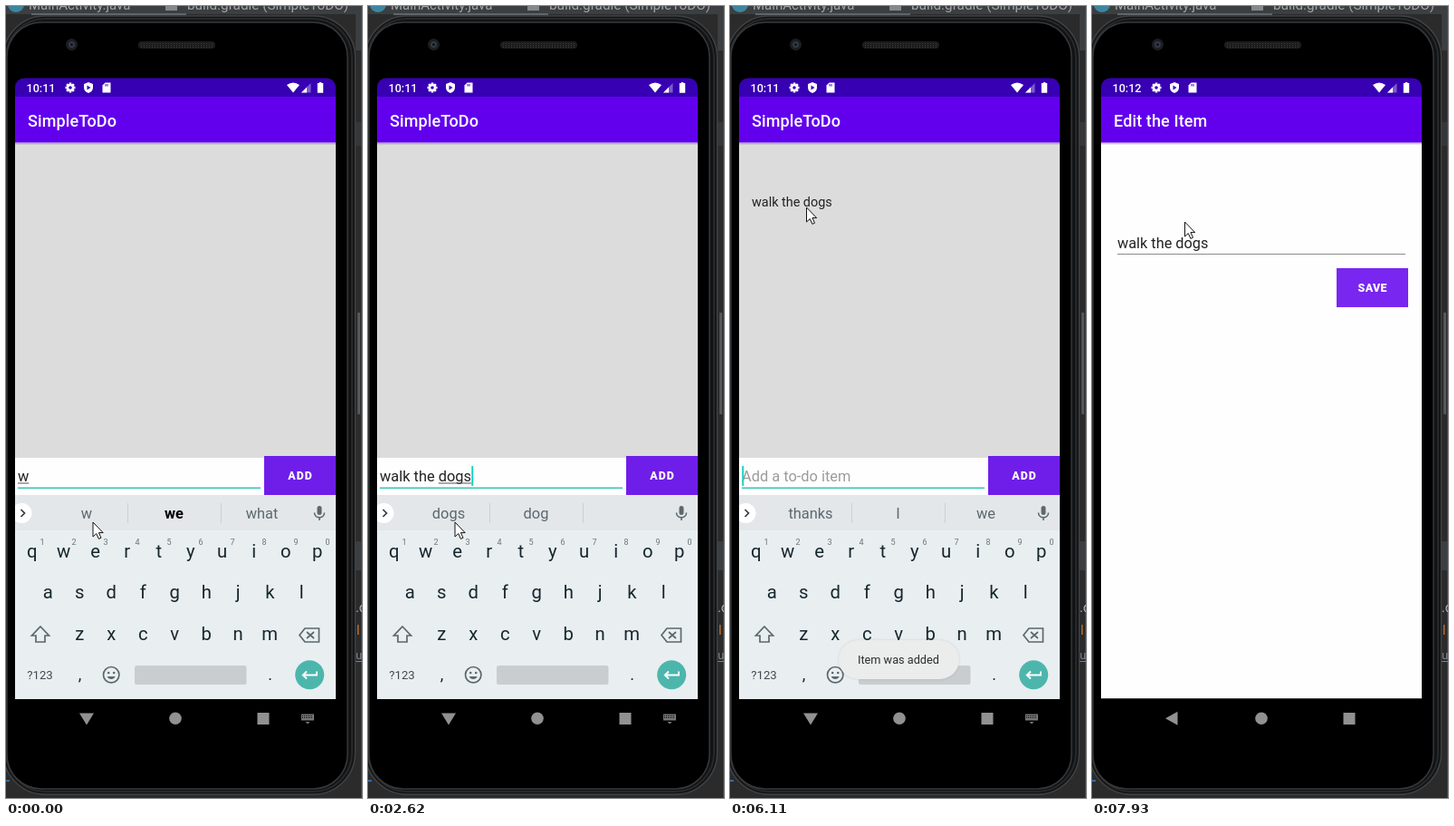
An HTML page with a canvas that plays this animation: 393x873 px, repeating every 8000 ms.

```html
<!DOCTYPE html>
<html lang="en">
<head>
<meta charset="utf-8">
<title>To-do app</title>
<style>
html, body { margin: 0; width: 100%; height: 100%; overflow: hidden; background: #2b2b2b; }
canvas { display: block; width: 393px; height: 873px; }
</style>
</head>
<body>
<canvas id="stage" width="393" height="873"></canvas>
<script>
const c = document.getElementById('stage').getContext('2d');
const LOOP = 8000;

const TICKS = [0, 120, 240, 740, 860, 980, 1130, 1280, 1400, 1910, 2030, 2470, 2620, 3150, 3270, 3410, 3540,
  3670, 3820, 4090, 4210, 4360, 4480, 4620, 4750, 4870, 5010, 5130, 5260, 5570, 5720, 5870, 5990, 6110, 6230,
  6380, 6500, 6620, 6900, 7030, 7420, 7540, 7660, 7780, 7930];

// time, committed text, word being composed, three suggestions, middle one bold
const TYPING = [
  [-600, '', 'w', 'w', 'we', 'what', true],
  [120, '', 'wa', 'wa', 'was', 'want', true],
  [240, '', 'wal', 'wal', 'walk', 'wall', true],
  [740, '', 'walk', 'walk', 'walking', 'walked', true],
  [860, 'walk ', '', 'to', 'the', 'through', false],
  [980, 'walk ', 't', 't', 'to', 'through', true],
  [1130, 'walk ', 'th', 'th', 'the', 'that', true],
  [1280, 'walk ', 'the', 'the', 'they', 'them', false],
  [1400, 'walk the ', '', 'dog', 'same', 'other', false],
  [1910, 'walk the ', 'd', 'd', 'dogs', 'dog', true],
  [2030, 'walk the ', 'do', 'do', 'dog', 'door', true],
  [2470, 'walk the ', 'dog', 'dog', 'dogs', 'does', true],
  [2620, 'walk the ', 'dogs', 'dogs', 'dog', '', false],
  [4090, '', '', 'thanks', 'I', 'we', false],
];

const POINTER = [
  [2620, 96, 569], [3150, 118, 563], [3270, 190, 546], [3410, 238, 532], [3540, 275, 524], [3670, 294, 522],
  [3820, 304.5, 522], [4360, 304.5, 522], [4480, 293, 517], [4620, 282, 513], [4870, 231, 502], [5010, 185, 455],
  [5260, 80, 322], [5570, 79, 219], [5720, 83, 222], [5870, 84.5, 222], [6620, 84.5, 222], [7030, 82.5, 220],
  [7780, 82.5, 220], [7930, 102.5, 238],
];

// Opening the edit screen: keyboard slide and opacity, list shift and dimming,
// reveal edge, edit screen offset, top and bottom of the sliding navigation strip
const OPENING = {
  7420: { keyY: 11, keyAlpha: .84, listY: -1, dim: .03, edge: 873, editY: 30, strip: [774, 793] },
  7540: { keyY: 44, keyAlpha: .23, listY: -3, dim: .085, edge: 261, editY: 23, strip: [786.5, 808] },
  7660: { keyY: 80, keyAlpha: 0, listY: -8, dim: .1, edge: 96, editY: 6 },
};
const RESTING = { keyY: 0, keyAlpha: 1, listY: 0, dim: 0, edge: 873, editY: 0 };
const OPENED = { keyY: 0, keyAlpha: 0, listY: 0, dim: 0, edge: 0, editY: 0 };

const clamp = v => Math.max(0, Math.min(1, v));

function track(keys, t) {
  if (t <= keys[0][0]) return keys[0].slice(1);
  const i = keys.findIndex(k => k[0] > t);
  if (i < 0) return keys[keys.length - 1].slice(1);
  const a = keys[i - 1], b = keys[i], k = (t - a[0]) / (b[0] - a[0]);
  return [a[1] + (b[1] - a[1]) * k, a[2] + (b[2] - a[2]) * k];
}

function rect(x, y, w, h, color) {
  c.fillStyle = color;
  c.fillRect(x, y, w, h);
}

function round(x, y, w, h, r, fill, stroke, width = 1) {
  c.beginPath();
  c.roundRect(x, y, w, h, r);
  if (fill) { c.fillStyle = fill; c.fill(); }
  if (stroke) { c.strokeStyle = stroke; c.lineWidth = width; c.stroke(); }
}

function disc(x, y, r, color) {
  c.beginPath();
  c.arc(x, y, r, 0, 7);
  c.fillStyle = color;
  c.fill();
}

function path(d, x, y, fill, stroke, width = 1) {
  const p = new Path2D(d);
  c.save();
  c.translate(x, y);
  if (fill) { c.fillStyle = fill; c.fill(p); }
  if (stroke) { c.strokeStyle = stroke; c.lineWidth = width; c.stroke(p); }
  c.restore();
}

function text(s, x, y, size, color, { weight = 400, align = 'left', spacing = 0 } = {}) {
  c.font = `${weight} ${size}px Roboto, sans-serif`;
  c.letterSpacing = spacing + 'px';
  c.textAlign = align;
  c.fillStyle = color;
  c.fillText(s, x, y);
  return c.measureText(s).width;
}

function desktop() {
  rect(0, 0, 393, 873, '#2b2b2b');
  rect(0, 0, 393, 9, '#3c3f41');
  disc(11, -2, 9, '#3e86a0');
  text('MainActivity.java', 25, 4, 15, '#a3a6a8');
  rect(176, 0, 13, 5, '#85898c');
  text('build.gradle (SimpleToDO)', 200, 4, 15.3, '#a3a6a8');
  rect(28, 8, 171, 2, '#626567');
  rect(386, 9, 7, 40, '#3c3f41');
  rect(386, 128, 7, 26, '#353739');
  rect(386, 590, 7, 32, '#3c3f41');
  rect(388, 338, 3, 112, '#55585a');
  rect(392, 0, 1, 873, '#484a4c');
  text('.c', 386, 668, 14, '#b5bcc4');
  text('l', 387, 693, 14, '#cc7832');
  text('u', 386, 720, 13, '#7c8790');
  rect(386, 722, 7, 1, '#7c8790');
  rect(0, 853, 4, 2, '#2f6ea8');
}

function phone() {
  round(-3, 11, 388.5, 858, 46, '#121314', '#404244', 1.5);
  round(0, 14, 382, 852, 43, null, '#27292b', 2);
  round(1, 18, 376, 845, 38, '#000', '#38393b', 1.5);
  disc(72.5, 42.5, 6.5, '#1c1e22');
  disc(72.5, 42.5, 3.5, '#343946');
  disc(72.5, 42.5, 1.5, '#11131a');
  round(146, 39, 85, 8, 4, '#1d1d1d');
  for (let x = 149; x < 229; x += 3) for (let y = 41; y < 46; y += 2) rect(x, y, 1, 1, '#383838');
}

function statusIcons(clock) {
  const white = '#fff';
  text(clock, 22.5, 94.5, 12.6, white, { weight: 500 });
  for (let i = 0; i < 8; i++) {
    c.save();
    c.translate(71, 90);
    c.rotate(i * Math.PI / 4);
    rect(-1.3, -5.5, 2.6, 3, white);
    c.restore();
  }
  c.beginPath();
  c.arc(71, 90, 2.9, 0, 7);
  c.strokeStyle = white;
  c.lineWidth = 2.2;
  c.stroke();
  path('M0-6L5-4V0C5 3 3 5 0 6C-3 5-5 3-5 0V-4Z', 91, 90, white);
  path('M-1.5-2.5L2.5 0L-1.5 2.5Z', 91, 90, '#3700b3');
  path('M-1.5-5.5H4.5V5.5H-4.5V-2.5Z', 111, 90, white);
  rect(109.5, 86, 1, 2.5, '#3700b3');
  rect(111.5, 86, 1, 2.5, '#3700b3');
  path('M0 5.5L-7-3Q0-8 7-3Z', 317, 90, white);
  path('M5.5-5V5.5H-5Z', 331, 90, 'rgba(255,255,255,.35)');
  path('M1-.5V5.5H-5Z', 331, 90, white);
  path('M-1.3-6H1.3V-5H3.2V5.8H-3.2V-5H-1.3Z', 347, 90, white);
}

function appBar(title) {
  rect(10, 70, 354, 30, '#3700b3');
  rect(10, 100, 354, 50.5, '#6200ee');
  text(title, 24, 133, 18, '#fff', { weight: 500, spacing: .12 });
  rect(10, 150.5, 354, 1, 'rgba(70,40,150,.4)');
  rect(10, 151.5, 354, 1.5, 'rgba(0,0,0,.1)');
}

function button(x, y, label, color, spacing) {
  rect(x, y, 79, 43, color);
  text(label, x + 39.5 + spacing / 2, y + 26, 12.4, '#fff', { weight: 800, align: 'center', spacing });
}

function listScreen(t, entry) {
  const [typedAt, done, word] = entry;
  rect(10, 100, 354, 664, '#fefefe');
  rect(10, 151, 354, 347, '#dcdcdc');
  appBar('SimpleToDo');
  if (t >= 4090) text('walk the dogs', 24, 221, 14.4, '#222');
  button(285, 496, 'ADD', '#6f1de9', 1.1);
  rect(13, 530.5, 268, 1.6, '#3cc5b5');

  if (!done && !word) text('Add a to-do item', 13, 524, 16.4, '#9b9b9b');
  const start = 13 + text(done, 13, 524, 16.4, '#222');
  const width = text(word, start, 524, 16.4, '#222');
  if (word) rect(start, 525.5, width, 1, '#555');
  if (Math.floor((t - typedAt) / 488) % 2 === 0) rect(start + width + .3, 507, 1.9, 22, '#0fd3c0');
}

function editScreen() {
  rect(10, 100, 354, 663.5, '#fefefe');
  rect(10, 763.5, 354, 60, '#000');
  appBar('Edit the Item');
  text('walk the dogs', 28, 267, 16.3, '#222');
  rect(28, 273, 318, 1, '#8c8c8c');
  button(270, 289, 'SAVE', '#7926f0', .3);
}

function keyRow(letters, x, y) {
  [...letters].forEach((k, i) => text(k, x + i * 35, y, 20.3, '#16272e', { align: 'center' }));
}

function keyPanel() {
  rect(10, 539, 354, 225, '#e9eef1');
  rect(10, 539, 354, 39, '#e3e7ea');
  round(6, 548, 22.5, 22, 11, '#fff');
}

function keys([, , , left, middle, right, bold]) {
  const gray = '#5c686e', center = { align: 'center' };
  path('M-2-4L2 0L-2 4', 18.5, 559, null, '#333b40', 1.7);
  text(left, 89, 565, 16.4, gray, center);
  text(middle, 185.5, 565, 16.4, bold ? '#000' : gray, { align: 'center', weight: bold ? 700 : 400 });
  text(right, 282.5, 565, 16.4, gray, center);
  rect(134, 548, 1, 22, '#cbd0d3');
  rect(237, 548, 1, 22, '#cbd0d3');
  round(343.5, 551, 5, 10, 2.5, gray);
  path('M-5.5 0C-5.5 7 5.5 7 5.5 0M0 5V8.5', 346, 558.5, null, gray, 1.6);

  keyRow('qwertyuiop', 28.7, 608);
  [...'1234567890'].forEach((k, i) => text(k, 40 + i * 35, 594, 9, '#6a757b', center));
  keyRow('asdfghjkl', 46.3, 653);
  keyRow('zxcvbnm', 81.2, 699);
  path('M0-9L9.5 1H5V8H-5V1H-9.5Z', 38, 693, null, gray, 1.7);
  path('M-11 0L-5-7.5H10.5V7.5H-5ZM-3-3.5L5 3.5M5-3.5L-3 3.5', 335, 693.5, null, gray, 1.7);
  text('?123', 37.5, 742, 13.2, '#3f4a50', center);
  text(',', 81.5, 743, 18, '#16272e', center);
  round(107.5, 728.5, 17.4, 17.4, 8.7, null, gray, 1.7);
  disc(113.2, 735, 1.3, gray);
  disc(119.2, 735, 1.3, gray);
  path('M-4.5 2C-3 6 3 6 4.5 2Z', 116.2, 737, gray);
  round(142, 727, 123.5, 21, 2.5, '#c9cdd0');
  text('.', 291.5, 743, 18, '#16272e', center);
  disc(335.2, 737.3, 16, '#4db6ac');
  path('M8-4V0H-7M-3-4L-7.2 0L-3 4', 335, 737.5, null, '#fff', 1.9);
}

// The panel fades faster than the letters on it.
function keyboard(entry, { keyY, keyAlpha }) {
  c.save();
  c.translate(0, keyY);
  c.globalAlpha = keyAlpha ** 2;
  keyPanel();
  c.globalAlpha = keyAlpha;
  keys(entry);
  c.restore();
}

function navIcons(keyboardUp, color) {
  if (keyboardUp) path('M-8-6H8L0 7Z', 89, 785.5, color);
  else path('M6.5-7.5V7.5L-7 0Z', 88, 785.3, color);
  disc(187, 785.3, 6.8, color);
  rect(277.5, 779, 13, 13, color);
  if (!keyboardUp) return;
  rect(326, 780.5, 14, 7, '#777');
  for (let x = 327; x < 339; x += 2) for (let y = 782; y < 786; y += 2) rect(x, y, 1, 1, '#000');
  path('M-2.5 0H2.5L0 2.5Z', 333, 789, '#777');
}

function toast(t) {
  const alpha = t < 5000 ? clamp((t - 4120) / 400) : clamp((6620 - t) / 400);
  if (!alpha) return;
  c.save();
  c.globalAlpha = alpha;
  c.shadowColor = 'rgba(0,0,0,.12)';
  c.shadowBlur = 3;
  round(120, 699, 133, 43, 21.5, '#ebecec');
  c.shadowColor = 'transparent';
  text('Item was added', 141, 725, 12.7, '#2c2c2c');
  c.restore();
}

function clipped(x, y, w, h, r, draw) {
  c.save();
  c.beginPath();
  c.roundRect(x, y, w, h, r);
  c.clip();
  draw();
  c.restore();
}

function screen(t) {
  const entry = TYPING.filter(e => e[0] <= t).pop();
  const pose = OPENING[t] || (t < 7420 ? RESTING : OPENED);

  clipped(10, 79.5, 354, 727.5, 10, () => {
    if (pose.edge > 0) {
      c.save();
      c.translate(0, pose.listY);
      listScreen(t, entry);
      c.restore();
      rect(10, 79, 354, 685, `rgba(0,0,0,${pose.dim})`);
    }
    clipped(10, pose.edge, 354, 873, 0, () => {
      c.translate(0, pose.editY);
      editScreen();
    });
    if (pose.strip) {
      const [top, bottom] = pose.strip;
      rect(10, 764, 354, 4, pose.edge > 764 ? '#bfc4c4' : '#fefefe');
      rect(10, 768, 354, top - 768, pose.edge > 764 ? '#edf1f2' : '#fefefe');
      keyboard(entry, pose);
      rect(10, top, 354, bottom - top, '#333');
    } else if (pose.keyAlpha > 0) {
      keyboard(entry, pose);
    }
    statusIcons(t < 6500 ? '10:11' : '10:12');
    navIcons(t < 7420, pose.strip ? '#c6c9c9' : '#919191');
    toast(t);
  });
}

function pointer(t) {
  const [x, y] = track(POINTER, t);
  path('M0 0V16L3.8 12.6L6.4 18.4L9 17.2L6.4 11.6H11.2Z', x, y, '#fff', '#111', 1);
}

function frame(now) {
  const time = now % LOOP;
  const t = TICKS.filter(k => k <= time).pop();
  desktop();
  phone();
  screen(t);
  pointer(t);
  requestAnimationFrame(frame);
}

requestAnimationFrame(frame);
</script>
</body>
</html>
```
